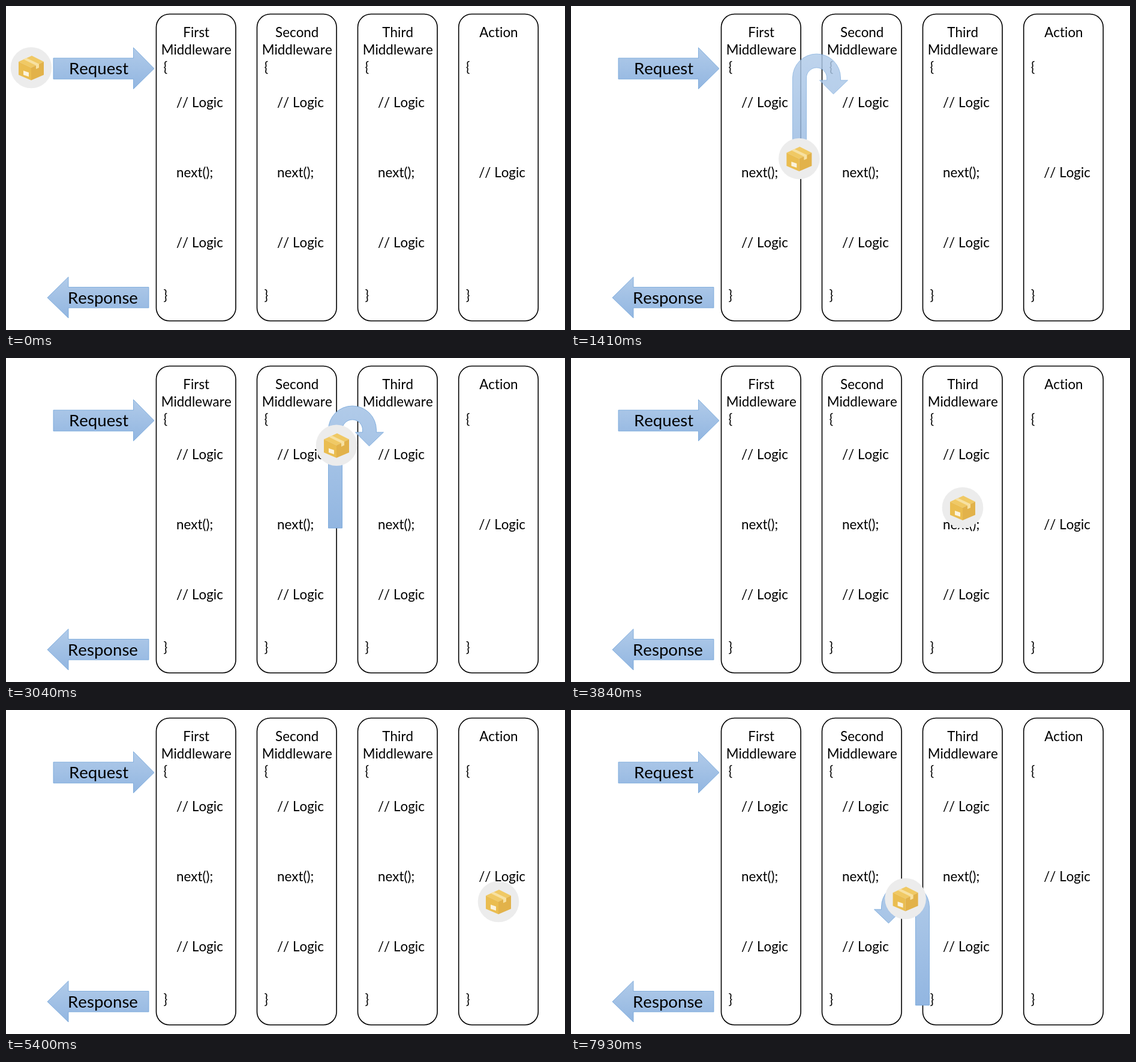
An HTML page for the animation above (7.99 s loop, 932x541 px).

```html
<!DOCTYPE html>
<html lang="en">
<head>
<meta charset="utf-8">
<title>Middleware pipeline</title>
<style>
  html, body { margin: 0; width: 100%; height: 100%; overflow: hidden; background: #fff; }
  svg { display: block; width: 932px; height: 541px; }
  text {
    font: 22.4px Lato, "Open Sans", sans-serif;
    font-kerning: none;
    font-variant-ligatures: none;
  }
  .label { font-size: 27.6px; }
  .title { text-anchor: middle; }
  .column { fill: none; stroke: #000; stroke-width: 1.6; }
  .arrow { fill: url(#blue); stroke: #6fa3d8; stroke-width: .8; }
</style>
</head>
<body>
<svg id="stage" viewBox="0 0 932 541">
  <defs>
    <linearGradient id="blue" x2="0" y2="1">
      <stop offset="0" stop-color="#b1cbe9"/>
      <stop offset="1" stop-color="#92b6e1"/>
    </linearGradient>
  </defs>
  <path class="arrow" d="M79 87H212.500V69.500L247 104.500L212.500 138.500V122H79Z"/>
  <path class="arrow" d="M238 469.500H104V452.500L69 487L104 521V504H238Z"/>
  <text class="label title" x="154.500" y="114">Request</text>
  <text class="label title" x="161.500" y="496.500">Response</text>
  <g id="columns"></g>
  <g id="turns"></g>
  <g id="parcel">
    <circle r="34.300" fill="#ececec"/>
    <path fill="#f0c964" d="M-21-10L1-20L21-10L0 0Z"/>
    <path fill="#eabd50" d="M-21-10L0 0V21L-21 12Z"/>
    <path fill="#e2b24a" d="M21-10L0 0V21L21 12Z"/>
    <path fill="#f7e1a2" d="M-13-14L-8-16.200L13-6.200V0L8 2.300V-3.800Z"/>
    <path fill="#fbf3dd" d="M-13 5L-4 8V15L-13 12Z"/>
  </g>
</svg>
<script>
const LOOP = 7990;
const RAMP = 270;   // ms of acceleration, and again of braking
const FADE = 450;

const byId = id => document.getElementById(id);

function add(parent, tag, attributes, content = "") {
  const node = document.createElementNS("http://www.w3.org/2000/svg", tag);
  for (const name in attributes) node.setAttribute(name, attributes[name]);
  node.textContent = content;
  parent.append(node);
  return node;
}

// Columns of code
const lineY = line => 51.8 + 29.3 * line;

function addColumn(left, title, code) {
  const columns = byId("columns");
  add(columns, "rect", { class: "column", x: left, y: 13.5, width: 132.6, height: 512.3, rx: 22 });
  title.forEach((word, i) =>
    add(columns, "text", { class: "title", x: left + 66.7, y: lineY(i) }, word));
  for (const [line, content] of [[2, "{"], ...code, [15, "}"]]) {
    const indent = content.length > 1 ? 33.5 : 12;
    add(columns, "text", { x: left + indent, y: lineY(line) }, content);
  }
}

const middlewareCode = [[4, "// Logic"], [8, "next();"], [12, "// Logic"]];
["First", "Second", "Third"].forEach((name, i) =>
  addColumn(250.5 + 168 * i, [name, "Middleware"], middlewareCode));
addColumn(754.7, ["Action"], [[8, "// Logic"]]);

// U-turn arrows: drawn from the outer foot of the shaft
const TURN = "M0 0V-164A40 40 0 0 1 80-164V-160H92L68-137L45-160H57V-164A17 17 0 0 0 23-164V0Z";

function addTurn(x, y, direction, fadeIn, fadeOut) {
  const node = add(byId("turns"), "path",
    { class: "arrow", d: TURN, transform: `translate(${x} ${y}) scale(${direction} 1)` });
  return { node, fadeIn, fadeOut };
}

const turns = [
  addTurn(369.5, 284, 1, 1054, 1675),
  addTurn(537.5, 284, 1, 2470, 3090),
  addTurn(705, 284, 1, 3900, 4517),
  addTurn(768, 493, -1, 5450, 6500),
  addTurn(597.5, 493, -1, 7200, 7930)
];

// Parcel route: down to the floor, across, up to the ceiling, across, down again
function uTurnPath(x, y, shaftX, endX, endY, floor, ceiling) {
  const r = 20, side = Math.sign(endX - x) * r;
  return `M${x} ${y}V${floor - r}Q${x} ${floor} ${x + side} ${floor}` +
    `H${shaftX - side}Q${shaftX} ${floor} ${shaftX} ${floor - r}` +
    `V${ceiling + r}Q${shaftX} ${ceiling} ${shaftX + side} ${ceiling}` +
    `H${endX - side}Q${endX} ${ceiling} ${endX} ${ceiling + r}V${endY}`;
}

function makeLeg(start, speed, d) {
  const path = document.createElementNS("http://www.w3.org/2000/svg", "path");
  path.setAttribute("d", d);
  const length = path.getTotalLength();
  return { start, speed, path, length, duration: length / speed + RAMP };
}

const legs = [
  makeLeg(330, .82, "M42 103H293.500Q313.500 103 313.500 123V250"),
  makeLeg(1114, .52, uTurnPath(313.5, 250, 380.5, 485, 250, 272, 94)),
  makeLeg(2530, .52, uTurnPath(485, 250, 551, 653, 250, 272, 94)),
  makeLeg(3957, .52, uTurnPath(653, 250, 719, 821, 320, 272, 94)),
  makeLeg(5534, .49, uTurnPath(821, 320, 754, 653, 456, 489, 315)),
  makeLeg(7257, .52, uTurnPath(653, 456, 586, 485, 456, 489, 315))
];

const clamp01 = value => Math.min(1, Math.max(0, value));

function distanceAt({ speed, duration, length }, time) {
  const rampUp = t => speed * t * t / (2 * RAMP);
  const t = Math.min(duration, Math.max(0, time));
  if (t < RAMP) return rampUp(t);
  if (t > duration - RAMP) return length - rampUp(duration - t);
  return speed * (t - RAMP / 2);
}

// The picture advances in steps: [first step, last step, number of steps]
const runs = [
  [390, 1100, 10], [1190, 1970, 11], [2030, 2820, 11],
  [2890, 3680, 11], [3760, 4550, 11], [4630, 5400, 11],
  [5490, 6250, 11], [6330, 7120, 11], [7190, 7930, 10]
];

function steppedTime(time) {
  const run = runs.findLast(([first]) => time >= first);
  if (!run) return 0;
  const [first, last, count] = run;
  const step = (last - first) / (count - 1);
  return Math.min(last, first + step * Math.floor((time - first) / step + .25));
}

function draw(time) {
  const leg = legs.findLast(({ start }) => time >= start) || legs[0];
  const { x, y } = leg.path.getPointAtLength(distanceAt(leg, time - leg.start));
  byId("parcel").setAttribute("transform", `translate(${x} ${y})`);
  for (const { node, fadeIn, fadeOut } of turns) {
    const opacity = clamp01((time - fadeIn) / FADE) - clamp01((time - fadeOut) / FADE);
    node.setAttribute("opacity", opacity);
  }
}

const startTime = performance.now();
function tick() {
  draw(steppedTime((performance.now() - startTime) % LOOP));
  requestAnimationFrame(tick);
}
tick();
</script>
</body>
</html>
```
